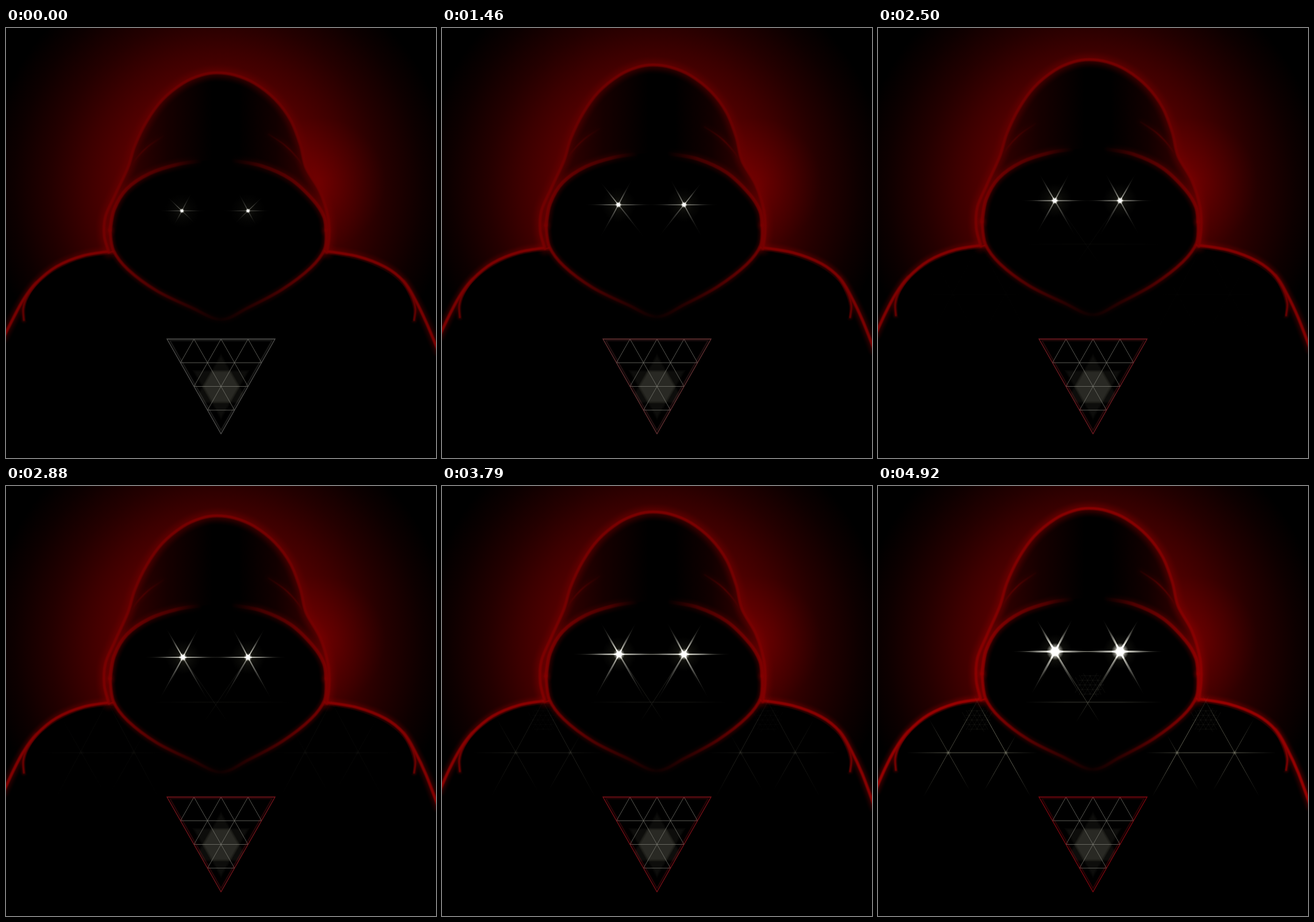
Recreate the animation shown at these times as an HTML page with a canvas. Size 748 by 748 pixels, loop 4.96 s.

```html
<!DOCTYPE html>
<html lang="en">
<head>
<meta charset="utf-8">
<title>Hooded figure</title>
<style>
html, body { margin: 0; width: 100%; height: 100%; overflow: hidden; background: #000; }
canvas { display: block; width: 100vw; height: 100vh; }
</style>
</head>
<body>
<canvas id="stage" width="748" height="748"></canvas>
<script>
const stage = document.getElementById('stage').getContext('2d', { alpha: false });
let ctx = stage;
const SIZE = 748, LOOP = 4960, FRAMES = 119;
const BEATS = [0, 20, 43, 60, 69, 91, 118];

// Upward travel of each height over the loop
const LIFT_Y = [0, 77, 200, 235, 318, 355, 388, 508, 600];
const LIFT = [40, 39, 36, 34.5, 30, 25, 18, 14, 0];

const HOOD = [[179, 390], [171, 362], [173, 328], [190, 290], [212, 243], [224, 205], [245, 162],
  [272, 125], [308, 96], [340, 82], [367, 78], [398, 82], [432, 96], [468, 124], [495, 160],
  [512, 203], [522, 243], [546, 284], [560, 328], [562, 362], [558, 390]];
const BRIM = [[181, 352], [188, 316], [210, 280], [250, 253], [300, 237], [345, 231], [368, 230],
  [395, 231], [445, 240], [495, 263], [535, 300], [553, 328], [557, 352]];
const JAW = [[557, 352], [554, 385], [530, 417], [480, 455], [422, 486], [374, 507],
  [322, 486], [262, 457], [212, 420], [187, 387], [181, 352]];
const LEFT_ARM = [[186, 388], [135, 396], [88, 415], [52, 444], [30, 473], [12, 506], [-4, 538]];
const RIGHT_ARM = [[553, 388], [610, 397], [660, 416], [692, 441], [712, 473], [731, 512], [752, 562]];
const LEFT_CUFF = [[52, 444], [36, 468], [30, 488], [31, 508]];
const RIGHT_CUFF = [[692, 441], [706, 466], [712, 488], [710, 508]];
const LEFT_CHEST = [[180, 394], [132, 402], [88, 421], [56, 446], [39, 470], [34, 490], [35, 510]];
const RIGHT_CHEST = [[707, 510], [708, 490], [701, 466], [687, 444], [656, 421], [610, 403], [560, 394]];
const LEFT_FOLD = [[274, 188], [246, 207], [222, 233], [203, 268]];
const RIGHT_FOLD = [[457, 185], [484, 203], [506, 225], [528, 256]];

let frame = -1, rise = 0;

function lerpTable(xs, ys, x) {
  let i = 1;
  while (i < xs.length - 1 && x > xs[i]) i++;
  const k = Math.min(1, Math.max(0, (x - xs[i - 1]) / (xs[i] - xs[i - 1])));
  return ys[i - 1] + (ys[i] - ys[i - 1]) * k;
}
const at = values => lerpTable(BEATS, values, frame);
const warp = y => y - rise * lerpTable(LIFT_Y, LIFT, y);
const red = (v, a = 1) => `rgba(${Math.round(v)},0,0,${a})`;

function trace(path, points, join) {
  const p = points.map(([x, y]) => [x, warp(y)]);
  if (join) path.lineTo(...p[0]); else path.moveTo(...p[0]);
  for (let i = 0; i < p.length - 1; i++) {
    const a = p[i - 1] || p[i], b = p[i], c = p[i + 1], d = p[i + 2] || c;
    path.bezierCurveTo(b[0] + (c[0] - a[0]) / 6, b[1] + (c[1] - a[1]) / 6,
      c[0] - (d[0] - b[0]) / 6, c[1] - (d[1] - b[1]) / 6, c[0], c[1]);
  }
  return path;
}
const curve = points => trace(new Path2D(), points);

function ramp(x0, y0, x1, y1, stops) {
  const g = ctx.createLinearGradient(x0, y0, x1, y1);
  stops.forEach(([k, c]) => g.addColorStop(k, c));
  return g;
}
function halo(x, y, r, stops) {
  const g = ctx.createRadialGradient(x, y, 0, x, y, r);
  stops.forEach(([k, c]) => g.addColorStop(k, c));
  ctx.fillStyle = g;
  ctx.fillRect(x - r, y - r, r * 2, r * 2);
}

// Soft line built from nested strokes, widest and faintest first
function glowStroke(path, style, width, spread, soft = 0.4) {
  ctx.save();
  ctx.globalCompositeOperation = 'lighten';
  ctx.lineCap = ctx.lineJoin = 'round';
  ctx.strokeStyle = style;
  const pass = (w, a) => {
    ctx.lineWidth = w;
    ctx.globalAlpha = a;
    ctx.stroke(path);
  };
  for (let i = 6; i > 0; i--) pass(width + spread * i * 0.6, soft * (0.29 - i * 0.037));
  pass(width + 1.5, 0.3);
  pass(width - 0.3, 0.5);
  pass(Math.max(0.8, width - 2), 0.65);
  ctx.restore();
}

function paintBackdrop() {
  ctx.fillStyle = '#000';
  ctx.fillRect(0, 0, SIZE, SIZE);
  halo(370, 275, 405, [[0, red(110)], [0.42, red(84)], [0.58, red(60)], [0.72, red(36)],
    [0.88, red(13)], [1, red(0)]]);
  halo(545, 270, 115, [[0, red(255, 0.17)], [0.5, red(255, 0.08)], [1, red(255, 0)]]);
}

function drawBody(tone) {
  const body = curve(LEFT_ARM);
  body.lineTo(-4, SIZE);
  body.lineTo(752, SIZE);
  trace(body, [...RIGHT_ARM].reverse(), true);
  ctx.fillStyle = '#000';
  ctx.fill(body);
  for (const arm of [LEFT_ARM, RIGHT_ARM]) glowStroke(curve(arm), red(tone), 5, 5);
  for (const cuff of [LEFT_CUFF, RIGHT_CUFF]) glowStroke(curve(cuff), red(tone * 0.85), 3, 3);
  const chest = curve(LEFT_CHEST);
  trace(chest, RIGHT_CHEST, true);
  chest.closePath();
  ctx.fillStyle = '#000';
  ctx.fill(chest);
}

function drawHood(tone) {
  const shape = curve(HOOD);
  trace(shape, JAW.slice(1, -1), true);
  shape.closePath();
  ctx.fillStyle = ramp(170, 0, 562, 0, [[0, red(75)], [0.13, red(46)], [0.28, red(22)],
    [0.48, red(0)], [0.6, red(0)], [0.76, red(17)], [0.88, red(40)], [1, red(75)]]);
  ctx.fill(shape);

  glowStroke(curve(HOOD), ramp(0, warp(77), 0, warp(390),
    [[0, red(tone * 0.88)], [0.4, red(tone * 0.8)], [1, red(tone * 0.9)]]), 5, 7, 0.45);
  const fold = (points, x0, x1) => glowStroke(curve(points),
    ramp(x0, 0, x1, 0, [[0, red(tone * 0.2)], [0.5, red(tone * 0.55)], [1, red(tone * 0.45)]]), 2.5, 5, 0.3);
  fold(LEFT_FOLD, 276, 203);
  fold(RIGHT_FOLD, 455, 528);

  const face = curve(BRIM);
  trace(face, JAW, true);
  face.closePath();
  ctx.fillStyle = '#000';
  ctx.fill(face);

  glowStroke(curve(BRIM), ramp(181, 0, 557, 0, [[0, red(tone * 0.9)], [0.14, red(tone * 0.75)],
    [0.3, red(tone * 0.52)], [0.43, red(0)], [0.56, red(0)], [0.7, red(tone * 0.52)],
    [0.86, red(tone * 0.75)], [1, red(tone * 0.9)]]), 6, 5);
  glowStroke(curve(JAW), ramp(181, 0, 557, 0, [[0, red(tone * 0.9)], [0.12, red(tone * 0.75)],
    [0.33, red(tone * 0.4)], [0.51, red(tone * 0.1)], [0.7, red(tone * 0.4)],
    [0.88, red(tone * 0.75)], [1, red(tone * 0.9)]]), 5, 4);
}

function ray(x, y, angle, length, width, alpha) {
  ctx.save();
  ctx.translate(x, y);
  ctx.rotate(angle * Math.PI / 180);
  ctx.fillStyle = ramp(0, 0, length, 0, [[0, `rgba(255,255,250,${alpha})`],
    [0.3, `rgba(235,235,225,${alpha * 0.75})`], [0.65, `rgba(180,180,165,${alpha * 0.32})`],
    [1, 'rgba(120,120,105,0)']]);
  ctx.beginPath();
  ctx.moveTo(0, -width / 2);
  ctx.lineTo(length * 0.4, -width / 2);
  ctx.lineTo(length, 0);
  ctx.lineTo(length * 0.4, width / 2);
  ctx.lineTo(0, width / 2);
  ctx.fill();
  ctx.restore();
}

function drawEye(x, y, side) {
  const power = at([0.36, 0.32, 0.68, 0.62, 0.72, 0.85, 1]);
  const across = at([42, 39, 72, 60, 69, 84, 78]);
  const up = at([38, 36, 60, 56, 60, 64, 66]);
  const down = at([31, 31, 86, 68, 86, 90, 88]);
  const tilt = at([44, 42, 57, 60, 60, 60, 60]);
  const core = at([2.2, 1.9, 3.3, 3.2, 3.6, 5, 7.5]);
  const width = at([1.2, 1.1, 1.9, 1.8, 2, 2.4, 3.2]);
  // Angles are for the left eye; the right one mirrors them
  const rays = [[180, across, 1], [0, across * 1.1, 0.95], [180 + tilt, up, 0.85], [298, up, 0.75],
    [119, down, 0.65], [tilt, down * 1.1, 0.5]];
  ctx.save();
  ctx.globalCompositeOperation = 'lighter';
  halo(x, y, 30, [[0, `rgba(90,90,68,${power * 0.55})`], [0.5, `rgba(70,70,52,${power * 0.2})`],
    [1, 'rgba(60,60,45,0)']]);
  for (const [angle, length, weight] of rays) {
    const a = side < 0 ? angle : 180 - angle;
    ray(x, y, a, length, width, power * weight);
    if (angle % 180) ray(x, y, a + 3 * side, length * 0.8, width * 0.6, power * weight * 0.4);
  }
  halo(x, y, core * 2, [[0, '#fff'], [0.4, '#fff'], [0.62, 'rgba(255,255,250,.4)'],
    [1, 'rgba(255,255,250,0)']]);
  ctx.restore();
}

// Line that fades out at both ends
function beam(x0, y0, x1, y1, alpha) {
  const c = a => `rgba(150,150,128,${a})`;
  ctx.strokeStyle = ramp(x0, y0, x1, y1, [[0, c(0)], [0.3, c(alpha)], [0.7, c(alpha)], [1, c(0)]]);
  ctx.beginPath();
  ctx.moveTo(x0, y0);
  ctx.lineTo(x1, y1);
  ctx.stroke();
}

function hatch(x, y, alpha) {
  if (alpha < 0.01) return;
  ctx.strokeStyle = `rgba(150,150,128,${alpha * 0.8})`;
  ctx.beginPath();
  for (let i = -2; i <= 2; i++) {
    const reach = 24 - Math.abs(i) * 4, lean = 12 - Math.abs(i) * 2;
    ctx.moveTo(x - reach, y + i * 8);
    ctx.lineTo(x + reach, y + i * 8);
    for (const s of [-1, 1]) {
      ctx.moveTo(x + i * 9 - s * lean, y - lean * 1.7);
      ctx.lineTo(x + i * 9 + s * lean, y + lean * 1.7);
    }
  }
  ctx.stroke();
}

function drawLattice() {
  ctx.lineWidth = 1;
  const mesh = at([0, 0, 0, 0.01, 0.06, 0.2, 0.62]);
  if (mesh > 0) {
    const reach = at([195, 195, 195, 195, 195, 195.5, 199]);
    const half = at([45, 45, 45, 45, 45, 47, 50]);
    for (const side of [-1, 1]) {
      const cx = 371.3 + side * reach, y = 464;
      beam(cx - side * 105, y, cx + side * 122, y, mesh);
      for (const s of [-1, 1]) {
        const x = cx + s * half, inner = s !== side;
        beam(cx - s * 6, y - 100, x + s * 43, y + 76, mesh * (inner ? 1 : 0.75));
        const top = inner ? 30 : 58;
        beam(x + s * top * 0.57, y - top, x - s * 37, y + 65, mesh * 0.65);
        halo(x, y, 5, [[0, `rgba(190,190,165,${mesh * 0.5})`], [1, 'rgba(150,150,130,0)']]);
      }
      hatch(cx, 407, mesh * 0.17);
    }
  }
  const veil = at([0, 0, 0, 0.05, 0.1, 0.17, 0.4]);
  if (veil > 0) {
    const y = warp(318);
    beam(255, 376, 495, 376, veil);
    beam(308, y, 385, 410, veil);
    beam(421, y, 345, 410, veil);
    hatch(369, 346, at([0, 0, 0, 0, 0, 0.01, 0.12]));
  }
}

function polygon(points) {
  ctx.beginPath();
  points.forEach(([x, y]) => ctx.lineTo(x, y));
  ctx.closePath();
}
function fillRing(x, y, r, sides, turn) {
  polygon(Array.from({ length: sides }, (_, i) => {
    const a = turn + i * 2 * Math.PI / sides;
    return [x + r * Math.cos(a), y + r * Math.sin(a)];
  }));
  ctx.fill();
}

function drawEmblem() {
  const blush = at([0, 0.2, 0.55, 0.72, 0.8, 0.88, 1]);
  const mix = (a, b) => Math.round(a + (b - a) * blush);
  const edge = a => `rgba(${mix(95, 150)},${mix(95, 8)},${mix(92, 18)},${a})`;
  const outline = [[280, 541], [468, 541], [374, 706]];
  ctx.save();
  polygon(outline);
  ctx.clip();
  for (const grow of [2, 0, -2]) {
    ctx.fillStyle = 'rgba(50,50,46,.1)';
    for (const turn of [-Math.PI / 2, Math.PI / 2]) fillRing(374, 624, 55 + grow * 1.5, 3, turn);
    ctx.fillStyle = 'rgba(58,58,55,.23)';
    fillRing(374, 624, 31 + grow, 6, 0);
  }
  ctx.restore();

  const dx = 47, dy = 41.25;
  ctx.lineWidth = 0.9;
  ctx.strokeStyle = 'rgba(135,135,126,.75)';
  ctx.beginPath();
  for (let row = 0; row < 4; row++) {
    const y = 541 + row * dy, x = 280 + row * dx / 2, n = 4 - row;
    if (row) {
      ctx.moveTo(x, y);
      ctx.lineTo(x + n * dx, y);
    }
    for (let i = 1; i < n; i++) {
      ctx.moveTo(x + i * dx - dx / 2, y + dy);
      ctx.lineTo(x + i * dx, y);
      ctx.lineTo(x + i * dx + dx / 2, y + dy);
    }
  }
  ctx.stroke();

  ctx.lineWidth = 1.3;
  ctx.strokeStyle = edge(0.9);
  polygon(outline);
  ctx.stroke();
  ctx.lineWidth = 2.5;
  ctx.strokeStyle = edge(0.25);
  polygon([[285, 543.5], [463, 543.5], [374, 700]]);
  ctx.stroke();
}

const backdrop = document.createElement('canvas');
backdrop.width = backdrop.height = SIZE;
ctx = backdrop.getContext('2d');
paintBackdrop();
ctx = stage;

function render(ms) {
  const next = Math.min(FRAMES - 1, Math.floor((ms % LOOP + 5) * 24 / 1000));
  if (next === frame) return;
  frame = next;
  const x = frame / (FRAMES - 1);
  rise = x + x * (1 - x) * (0.17 + 0.3 * x);
  const tone = at([132, 130, 136, 140, 142, 147, 162]);
  ctx.drawImage(backdrop, 0, 0);
  drawBody(tone);
  drawHood(tone);
  drawLattice();
  const eyeY = warp(318);
  drawEye(306 + 2 * Math.min(1, x * 1.5), eyeY, -1);
  drawEye(421, eyeY, 1);
  drawEmblem();
}

const start = performance.now();
function tick() {
  render(Math.max(0, performance.now() - start));
  requestAnimationFrame(tick);
}
tick();
</script>
</body>
</html>
```
